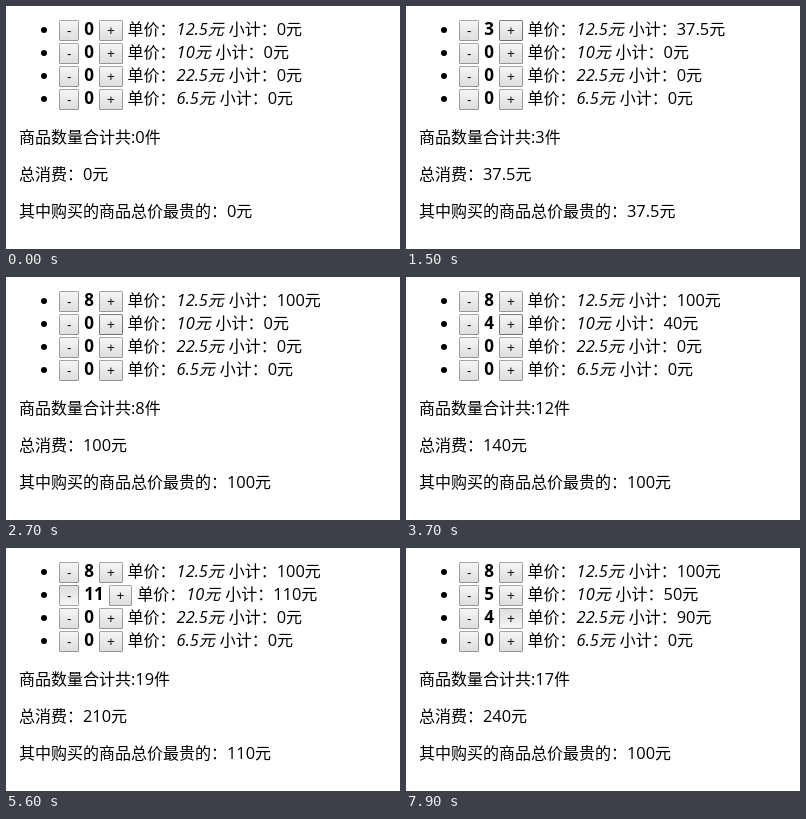
Recreate the animation shown at these times as an HTML page with a canvas. Size 394 px wide and 243 px high, loop 8000 ms.

```html
<!DOCTYPE html>
<html lang="zh-CN">
<head>
<meta charset="utf-8">
<title>商品合计</title>
<style>
html, body { margin: 0; width: 100%; height: 100%; overflow: hidden; background: #fff; }
canvas { display: block; }
</style>
</head>
<body>
<canvas id="stage" width="394" height="243"></canvas>
<script>
const ctx = document.getElementById('stage').getContext('2d');
const LOOP = 8000;
const HAN = '16px "Noto Sans CJK SC", "Noto Sans CJK JP", "Noto Sans CJK", sans-serif';
const LATIN = '16.4px "Open Sans", "Noto Sans", sans-serif';
const BOLD = 'bold 17px "Open Sans", "Noto Sans", sans-serif';
const LABEL = '13.333px "Liberation Sans", sans-serif';
const LEFT = 13, INDENT = 53, SPACE = 4.9, BOLD_W = 9.7, LEAN = 1, ROW_H = 23;
const WIDTH = { '-': 20.4, '+': 23.8 };
const prices = [12.5, 10, 22.5, 6.5];

// Each visit of the pointer to a button: when it hovers, presses and clicks.
const visits = [
  { row: 0, sign: '-', from: 600, to: 700, press: [], click: [] },
  { row: 0, sign: '+', from: 800, to: 2700,
    press: [1100, 1300, 1800, 2300, 2500],
    click: [1200, 1400, 1500, 1600, 1900, 2000, 2400, 2600] },
  { row: 1, sign: '+', from: 2700, to: 5000,
    press: [3100, 3300, 3600, 3900, 4200, 4400, 4700],
    click: [3200, 3400, 3500, 3700, 3800, 4000, 4100, 4300, 4500, 4600, 4800, 4900] },
  { row: 1, sign: '-', from: 5200, to: 6700,
    press: [5400, 5600, 5800, 6000, 6200, 6400],
    click: [5500, 5700, 5900, 6100, 6300, 6500, 6600] },
  { row: 2, sign: '+', from: 6700, to: LOOP,
    press: [7200, 7400, 7700, 7900],
    click: [7300, 7500, 7600, 7800] }
];

const past = (times, t) => times.filter(x => x <= t);

function countsAt(t) {
  const counts = prices.map(() => 0);
  for (const v of visits) {
    counts[v.row] += past(v.click, t).length * (v.sign === '+' ? 1 : -1);
  }
  return counts;
}

function buttonState(row, sign, t) {
  const v = visits.find(v => v.row === row && v.sign === sign && t >= v.from && t < v.to);
  if (!v) return 'normal';
  const down = Math.max(0, ...past(v.press, t));
  const up = Math.max(0, ...past(v.click, t));
  return down > up ? 'pressed' : 'hover';
}

// Draws mixed Chinese and Latin text, returns the x where it ends.
function write(text, x, y, style = '') {
  for (const run of text.match(/[\x20-\x7e]+|[^\x20-\x7e]+/g)) {
    ctx.font = style + (run.charCodeAt(0) < 127 ? LATIN : HAN);
    ctx.fillText(run, x, y);
    x += ctx.measureText(run).width;
  }
  return x;
}

function roundBox(x, y, w, h) {
  ctx.beginPath();
  ctx.roundRect(x, y, w, h, 1);
}

function button(sign, x, y, state) {
  const left = Math.round(x), w = Math.round(x + WIDTH[sign]) - left, h = 21;
  const shade = ctx.createLinearGradient(0, y, 0, y + h);
  const stops = ['#f6f6f6', '#dddddd'];
  if (state === 'pressed') stops.reverse();
  stops.forEach((c, i) => shade.addColorStop(i, c));
  ctx.fillStyle = shade;
  roundBox(left, y, w, h);
  ctx.fill();
  ctx.strokeStyle = state === 'hover' ? 'rgba(0,0,0,.5)' : 'rgba(0,0,0,.333)';
  ctx.lineWidth = 1;
  roundBox(left + 0.5, y + 0.5, w - 1, h - 1);
  ctx.stroke();
  ctx.fillStyle = '#000';
  ctx.font = LABEL;
  ctx.fillText(sign, x + 8, y + 15);
  return x + WIDTH[sign];
}

function itemRow(row, count, t) {
  const top = 14 + row * ROW_H, base = top + 15;
  ctx.beginPath();
  ctx.arc(38, top + 10, 3, 0, Math.PI * 2);
  ctx.fill();

  let x = button('-', INDENT, top, buttonState(row, '-', t)) + SPACE;
  ctx.font = BOLD;
  for (const digit of String(count)) {
    ctx.fillText(digit, x, base);
    x += BOLD_W;
  }
  x = button('+', x + SPACE, top, buttonState(row, '+', t)) + SPACE;
  x = write('单价：', x, base) + LEAN;
  x = write(prices[row] + '元', x, base, 'italic ') + SPACE;
  write('小计：' + count * prices[row] + '元', x, base);
}

function draw(t) {
  const counts = countsAt(t);
  const sums = counts.map((n, i) => n * prices[i]);
  const add = (a, b) => a + b;
  ctx.fillStyle = '#fff';
  ctx.fillRect(0, 0, 394, 243);
  ctx.fillStyle = '#000';
  counts.forEach((n, row) => itemRow(row, n, t));
  write('商品数量合计共:' + counts.reduce(add) + '件', LEFT, 137);
  write('总消费：' + sums.reduce(add) + '元', LEFT, 174);
  write('其中购买的商品总价最贵的：' + Math.max(...sums) + '元', LEFT, 211);
}

const start = performance.now();
function tick() {
  draw((performance.now() - start) % LOOP);
  requestAnimationFrame(tick);
}
tick();
</script>
</body>
</html>
```
